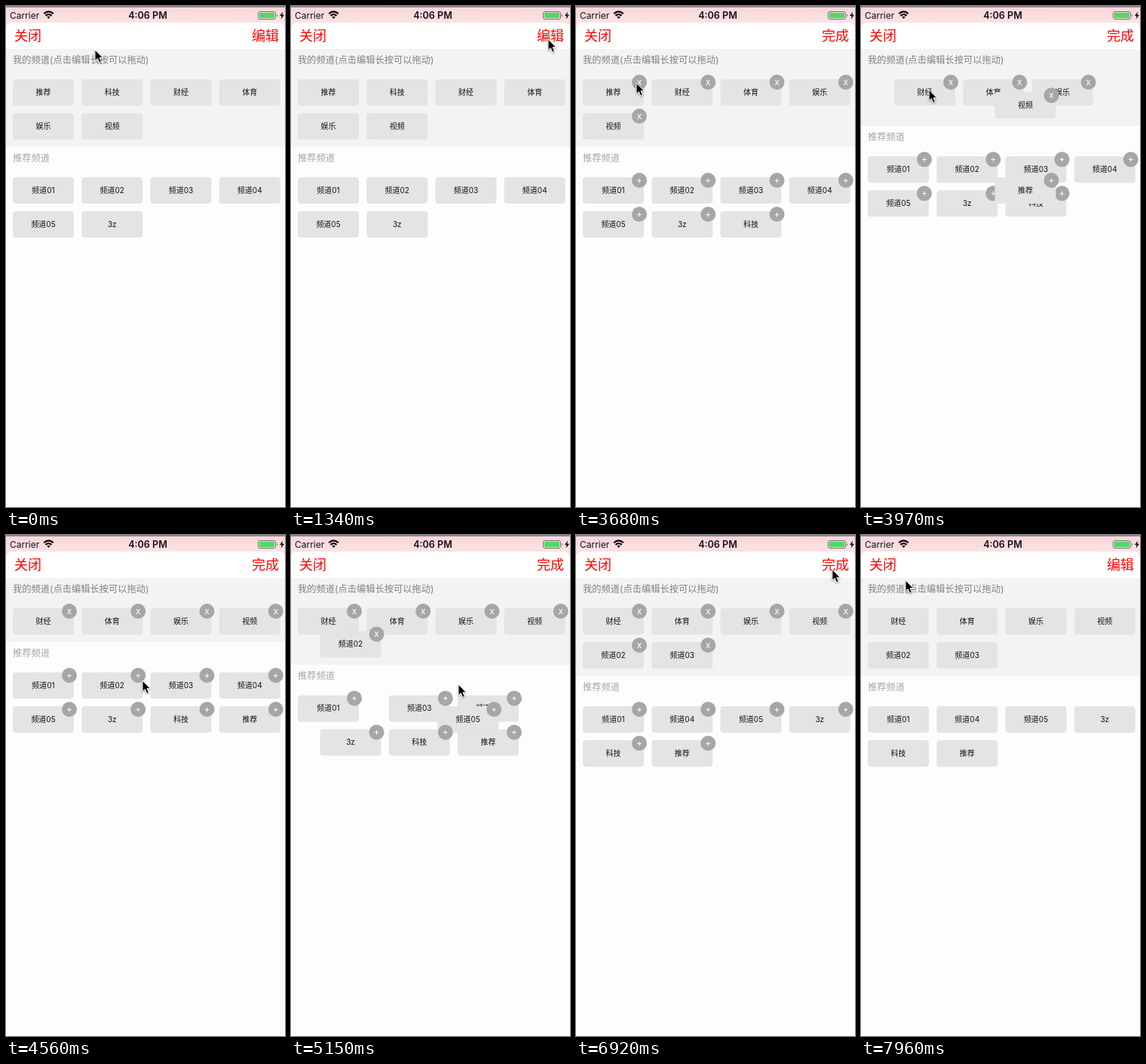
Recreate the animation shown at these times as an HTML page. Size 370 by 664 pixels, loop 8 s.

```html
<!DOCTYPE html>
<html lang="zh-CN">
<head>
<meta charset="utf-8">
<style>
html, body { margin: 0; width: 100%; height: 100%; overflow: hidden; background: #fdfdfd; }
body { font-family: Inter, "Noto Sans CJK SC", "Noto Sans CJK", sans-serif; }
#stage { position: relative; width: 370px; height: 664px; overflow: hidden; background: #fdfdfd; }
#stage div, #stage svg { position: absolute; white-space: nowrap; }
#status { left: 0; top: 0; width: 370px; height: 36px; background: linear-gradient(#8c7883 0, #a08a94 1.5px, #f7d8dc 2.5px, #fce2e4 22px); color: #111; }
#status div { line-height: 16px; top: 4.5px; }
#nav { left: 0; top: 22px; width: 370px; height: 35px; background: #fff; border-radius: 8px 8px 0 0; }
#nav div { top: 0; line-height: 35px; font-size: 18px; color: #f00; }
#mine { left: 0; top: 57px; width: 370px; background: #f3f3f3; }
.title { left: 9px; line-height: 30px; font-size: 12.25px; }
.cell { left: 0; top: 0; width: 81px; height: 35px; border-radius: 4px; background: #e4e4e4; color: #111; font-size: 10px; line-height: 35px; text-align: center; }
.badge { left: 65px; top: -6px; width: 20px; height: 20px; border-radius: 50%; background: #a6a6a6; color: #fff; font-size: 12px; line-height: 20px; }
#cursor { left: 0; top: 0; overflow: visible; z-index: 50; }
</style>
</head>
<body>
<div id="stage">
  <div id="status">
    <div style="left:5px;font-size:12px">Carrier</div>
    <div style="left:0;width:376px;text-align:center;font-size:12.6px;font-weight:600">4:06 PM</div>
    <svg width="370" height="22" fill="none">
      <g stroke="#000" stroke-width="2.1">
        <path d="M50.2 10.3Q56.5 4.6 62.8 10.3"/>
        <path d="M52.5 12.9Q56.5 9.3 60.5 12.9"/>
      </g>
      <path d="M54.3 14.5Q56.5 12.8 58.7 14.5L56.5 17Z" fill="#000"/>
      <rect x="334.5" y="7.5" width="23" height="10" rx="2.5" stroke="#776b6e"/>
      <rect x="336" y="9" width="20" height="7" rx="1" fill="#4cd964"/>
      <path d="M359 10.5q2 2 0 4Z" fill="#776b6e"/>
      <path d="M367.2 7.5L363 13H365.6L364.6 17.5L369 11.8H366.2Z" fill="#000"/>
    </svg>
  </div>
  <div id="nav"><div style="left:11px">关闭</div><div id="mode" style="left:326px"></div></div>
  <div id="mine"></div>
  <div class="title" style="top:57px;color:#808080">我的频道(点击编辑长按可以拖动)</div>
  <div class="title" id="more" style="color:#a6a6a6">推荐频道</div>
  <svg id="cursor" width="14" height="20">
    <path d="M0 0V14.5L3.3 11.5L5.8 17.2L8.4 16.1L6 10.6H10.4Z" fill="#000" stroke="#fff" stroke-width="1" style="filter:drop-shadow(0 1px 1px #0006)"/>
  </svg>
</div>
<script>
const LOOP = 8000, STEP = 147.2, MOVE = 250, REST = 430, TOP = 57;
const $ = id => document.getElementById(id);
const mix = (a, b, p) => a + (b - a) * p;
const ease = p => p * p * (3 - 2 * p);
const clamp = p => Math.max(0, Math.min(1, p));

// The pointer waits REST ms on a spot before it taps there.
const stops = [
  { at: 0, x: 118, y: 58 },
  { at: 440, x: 145, y: 122 },
  { at: 740, x: 88, y: 92 },
  { at: 1560, x: 341, y: 44, tap: 'mode' },
  { at: 2770, x: 179, y: 97, tap: '科技' },
  { at: 3830, x: 80, y: 102, tap: '推荐' },
  { at: 4997, x: 181, y: 193, tap: '频道02' },
  { at: 5150, x: 222, y: 198 },
  { at: 5866, x: 181, y: 236, tap: '频道03' },
  { at: 6035, x: 208, y: 238 },
  { at: 7400, x: 341, y: 44, tap: 'mode' },
  { at: 7940, x: 59, y: 60 }
];

const numbered = Array.from({ length: 5 }, (_, i) => '频道0' + (i + 1));
const lists = [['推荐', '科技', '财经', '体育', '娱乐', '视频'], [...numbered, '3z']];

// A tapped channel goes to the end of the other section.
function toggle(state, name) {
  const home = state[0].includes(name) ? 0 : 1;
  return state.map((list, i) => i === home ? list.filter(n => n !== name) : [...list, name]);
}

function add(parent, cls, text) {
  const el = document.createElement('div');
  el.className = cls;
  el.textContent = text;
  return parent.appendChild(el);
}

const cells = lists.flat().map(name => {
  const el = add($('stage'), 'cell', name);
  return { name, el, badge: add(el, 'badge', '') };
});

const height = state => 40 + 45 * Math.ceil(state[0].length / 4);

function place(state, name) {
  const section = state[0].includes(name) ? 0 : 1;
  const index = state[section].indexOf(name);
  return { section, index, x: 9 + 91.25 * (index % 4), y: 40 + 45 * Math.floor(index / 4) };
}

function pointer(t) {
  const i = stops.findLastIndex(s => s.at <= t);
  const a = stops[i], b = stops[i + 1] || a;
  const span = b.at - a.at - (b.tap ? REST : 0);
  const p = ease(clamp((t - a.at) / (span || 1)));
  return [mix(a.x, b.x, p), mix(a.y, b.y, p)];
}

function draw(t) {
  let from = lists, to = lists, p = 1, editing = false;
  for (const { at, tap } of stops) {
    if (!tap || at > t) continue;
    if (tap === 'mode') { editing = !editing; continue; }
    from = to;
    to = toggle(to, tap);
    p = ease(clamp((t - at) / MOVE));
  }
  const h = mix(height(from), height(to), p);

  $('mode').textContent = editing ? '完成' : '编辑';
  $('mine').style.height = h + 'px';
  $('more').style.top = TOP + h + 'px';

  for (const { name, el, badge } of cells) {
    const a = place(from, name), b = place(to, name);
    // Rows slide relative to the section the cell now belongs to.
    const y = TOP + b.section * h + mix(a.y, b.y, p);
    el.style.transform = `translate(${mix(a.x, b.x, p)}px, ${y}px)`;
    el.style.zIndex = 1 + b.section * 20 + b.index;
    badge.textContent = b.section ? '+' : 'x';
    badge.style.display = editing ? 'block' : 'none';
  }

  const [x, y] = pointer(t);
  $('cursor').style.transform = `translate(${x}px, ${y}px)`;
}

const start = performance.now();
function tick() {
  const t = (performance.now() - start) % LOOP;
  // The screen refreshes in coarse steps.
  draw(Math.floor((t + 6) / STEP) * STEP);
  requestAnimationFrame(tick);
}
tick();
</script>
</body>
</html>
```
